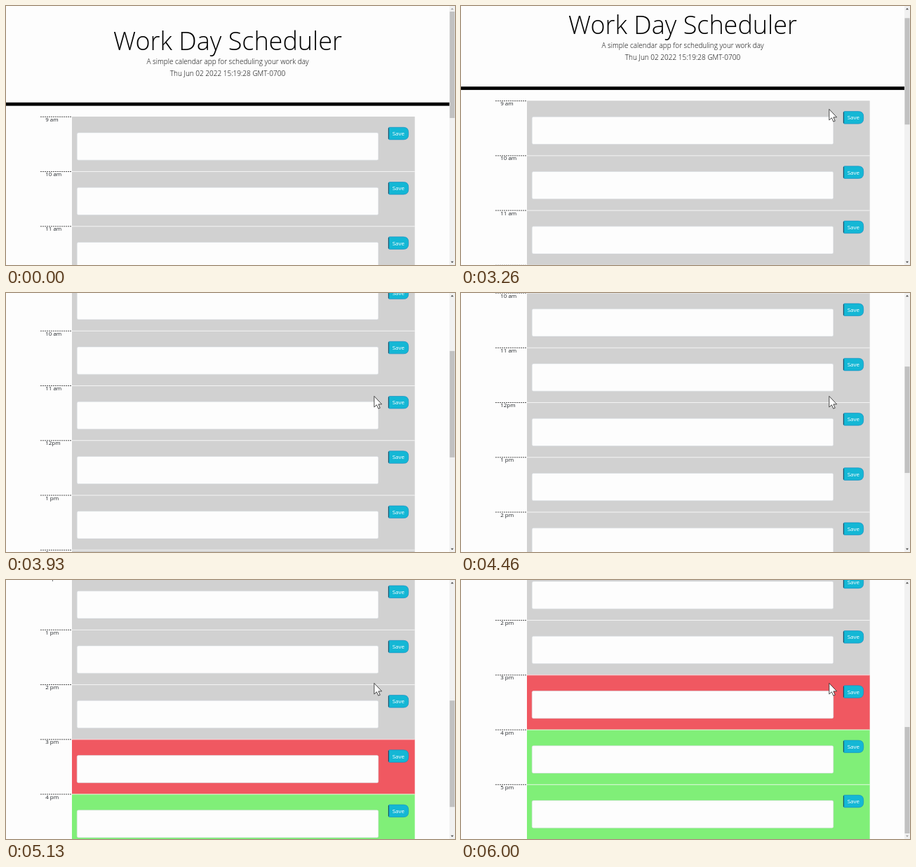
An HTML page that plays this animation: 640 by 370 pixels, repeating every 6060 ms.

```html
<!DOCTYPE html>
<html lang="en">
<head>
<meta charset="utf-8">
<title>Work Day Scheduler</title>
<style>
  html, body { margin: 0; width: 100%; height: 100%; overflow: hidden; background: #fdfdfd; }
  svg { display: block; width: 640px; height: 370px; font-family: "Open Sans", sans-serif; }
  .lead { font-size: 10px; font-weight: 300; }
  .small { font-size: 8px; }
</style>
</head>
<body>
<svg id="stage" viewBox="0 0 640 370">
  <rect width="640" height="370" fill="#fdfdfd"/>
  <g id="page">
    <g text-anchor="middle" fill="#000">
      <text x="316" y="63" font-size="36" font-weight="300">Work Day Scheduler</text>
      <text class="lead" x="316" y="82.5">A simple calendar app for scheduling your work day</text>
      <text class="lead" x="316" y="99.5">Thu Jun 02 2022 15:19:28 GMT-0700</text>
    </g>
    <rect y="137.8" width="632" height="4.8"/>
  </g>
  <g id="scrollbar">
    <rect x="632" width="8" height="370" fill="#f1f1f1"/>
    <rect id="thumb" x="632.5" y="8" width="7" height="152" fill="#c1c1c1"/>
    <path id="up" d="M634 5.2L636 2.8L638 5.2Z"/>
    <path id="down" d="M634 364.8L636 367.2L638 364.8Z"/>
  </g>
  <path id="cursor" d="M524.8 147.4V163L528.4 159.8L530.8 165.2L533.2 164.2L530.9 158.9H535.6Z"
    fill="#fff" stroke="#222" stroke-width=".8"/>
</svg>
<script>
const LOOP = 6060, FRAME = 1000 / 15;
const TOP = 158, PITCH = 78.25, MAX_SCROLL = 492;
const CURSOR_IN = 44;
const GREY = '#d1d1d1', RED = '#f05861', GREEN = '#80ef78';
const HOURS = ['9 am', '10 am', '11 am', '12pm', '1 pm', '2 pm', '3 pm', '4 pm', '5 pm'];

// Wheel scrolling: [frame, offset, speed per frame]
const SCROLL = [
  [45, 0, 0], [49, 22.7, 13], [59, 182.3, 14], [61, 200, 0], [62, 200, 0],
  [67, 236.5, 15], [77, 400, 15], [82, 450, 0], [84, 450, 0], [90, MAX_SCROLL, 0]
];

const $ = id => document.getElementById(id);

function add(parent, tag, attrs, text) {
  const el = document.createElementNS('http://www.w3.org/2000/svg', tag);
  for (const key in attrs) el.setAttribute(key, attrs[key]);
  if (text) el.textContent = text;
  parent.appendChild(el);
  return el;
}

function addRow(label, i) {
  const row = add($('page'), 'g', { transform: `translate(0 ${TOP + i * PITCH})` });
  const fill = i < 6 ? GREY : i === 6 ? RED : GREEN;
  add(row, 'path', { d: 'M49 .3H94', stroke: '#222', 'stroke-width': .8, 'stroke-dasharray': '2 1' });
  add(row, 'text', { class: 'small', x: 56.2, y: 6.9, fill: '#212529' }, label);
  add(row, 'rect', { x: 94, width: 488.7, height: PITCH + .3, fill });
  if (i) add(row, 'path', { d: 'M94 .3H582.7', stroke: '#fdfdfd', 'stroke-width': .8 });
  add(row, 'rect', {
    x: 101.2, y: 23, width: 429.6, height: 39.2, rx: 2,
    fill: '#fdfdfd', stroke: '#ced4da', 'stroke-width': .5
  });
  add(row, 'path', {
    d: 'M546.8 15.3H566.5Q573.7 15.3 573.7 22.5V25.7Q573.7 32.9 566.5 32.9H546.8Q545.2 32.9 545.2 31.3V16.9Q545.2 15.3 546.8 15.3Z',
    fill: '#14b7d5', stroke: '#1486c0', 'stroke-width': .6
  });
  add(row, 'path', { d: 'M545.4 16.3V31.9', stroke: '#123', 'stroke-width': .7 });
  add(row, 'text', { class: 'small', x: 559.3, y: 27, 'text-anchor': 'middle', fill: '#fff' }, 'Save');
}

function scrollAt(n) {
  if (n <= SCROLL[0][0]) return 0;
  const i = SCROLL.findIndex(p => n <= p[0]);
  if (i < 0) return MAX_SCROLL;
  const [n0, y0, v0] = SCROLL[i - 1], [n1, y1, v1] = SCROLL[i];
  const span = n1 - n0, u = (n - n0) / span, w = 1 - u;
  return y0 * w * w * (1 + 2 * u) + y1 * u * u * (1 + 2 * w)
    + span * u * w * (v0 * w - v1 * u);
}

function render(time) {
  const n = Math.floor((time % LOOP + 6.7) / FRAME);
  const y = scrollAt(n);
  $('page').setAttribute('transform', `translate(0 ${-y})`);
  $('thumb').setAttribute('y', 8 + y / MAX_SCROLL * 202);
  $('up').setAttribute('fill', y > 0 ? '#505050' : '#a3a3a3');
  $('down').setAttribute('fill', y < MAX_SCROLL ? '#505050' : '#a3a3a3');
  $('cursor').setAttribute('visibility', n >= CURSOR_IN ? 'visible' : 'hidden');
}

HOURS.forEach(addRow);
const start = performance.now();
function tick() {
  render(performance.now() - start);
  requestAnimationFrame(tick);
}
tick();
</script>
</body>
</html>
```
